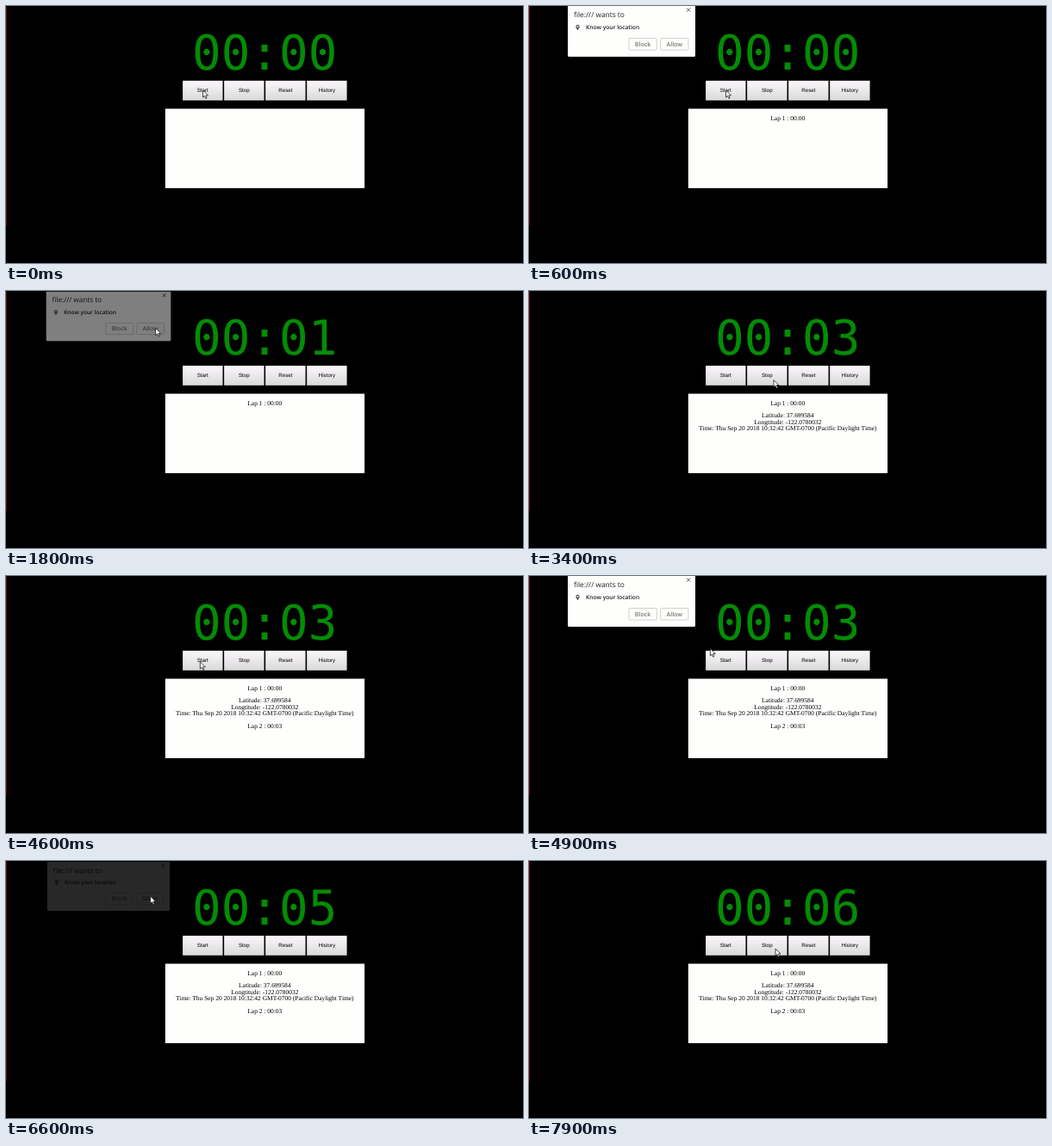
These frames come from a looping animation (600x299 px, 8000 ms). An HTML page:

```html
<!DOCTYPE html>
<html lang="en">
<head>
<meta charset="utf-8">
<title>Stopwatch</title>
<style>
  html, body { margin: 0; width: 100%; height: 100%; overflow: hidden; background: #000; }
  svg { display: block; width: 100%; height: 100%; text-rendering: geometricPrecision; }
  #clock { font: 55.9px "DejaVu Sans Mono", monospace; fill: #048c04; text-anchor: middle; }
  #buttons text { font: 6.21px "Liberation Sans", sans-serif; text-anchor: middle; }
  #laps { font: 7.46px "Liberation Serif", serif; text-anchor: middle; }
  #prompt { font-family: "Open Sans", sans-serif; fill: #222; }
  #prompt .action { font-size: 7.1px; font-weight: 600; fill: #7c7874; text-anchor: middle; }
</style>
</head>
<body>
<svg viewBox="0 0 600 299" xmlns="http://www.w3.org/2000/svg">
  <defs>
    <linearGradient id="face" x1="0" y1="0" x2="0" y2="1">
      <stop offset="0" stop-color="#fbf7fb"/>
      <stop offset="1" stop-color="#dadada"/>
    </linearGradient>
    <linearGradient id="pressed" x1="0" y1="0" x2="0" y2="1">
      <stop offset="0" stop-color="#dcd9dc"/>
      <stop offset="1" stop-color="#f0f0f0"/>
    </linearGradient>
  </defs>
  <rect width="600" height="299"/>
  <rect width="1" height="256" fill="#6a0000"/>
  <text id="clock" x="300.2" y="74.1">00:00</text>
  <g id="buttons"></g>
  <rect x="184.8" y="119.5" width="231.3" height="92.4" fill="#fefefd"/>
  <g id="laps"></g>
  <g id="prompt">
    <path d="M45 0H193V57.5Q193 59 191.5 59H46.5Q45 59 45 57.5Z" fill="#fefefd"/>
    <text x="52" y="12.9" font-size="8.4" font-weight="500">file:/// wants to</text>
    <text x="66" y="27.2" font-size="6.7" font-weight="600">Know your location</text>
    <path d="M56.5 28.2C55.2 26.2 54.3 25 54.3 23.9A2.2 2.2 0 0 1 58.7 23.9C58.7 25 57.8 26.2 56.5 28.2ZM56.5 23A.9 .9 0 1 0 56.51 23Z" fill="#555" fill-rule="evenodd"/>
    <path d="M183 2.4L187.2 6.6M187.2 2.4L183 6.6" stroke="#444" stroke-width=".9"/>
    <g fill="none" stroke="#c8c6c4" stroke-width=".8">
      <rect x="116" y="37.5" width="32.3" height="13.6" rx="1"/>
      <rect x="152.6" y="37.5" width="32.3" height="13.6" rx="1"/>
    </g>
    <text class="action" x="132" y="46.7">Block</text>
    <text class="action" x="168.8" y="46.7">Allow</text>
  </g>
  <path id="cursor" d="M0 0V8.3L1.9 6.5L3.2 9.6L4.6 9L3.3 6H6Z"
        fill="#fff" stroke="#111" stroke-width=".75" stroke-linejoin="round"/>
</svg>
<script>
const LOOP = 8000, STEP = 100;
const $ = id => document.getElementById(id);
const clamp = v => Math.min(1, Math.max(0, v));
const ease = u => u * u * (3 - 2 * u);

// Each run: clock starts, permission is allowed, clock stops.
const runs = [
  { start: 400, allow: 1600, stop: 3500, press: 300 },
  { start: 4600, allow: 6300, stop: LOOP, press: 4500 }
];
const LOCATED = 2100;

const moves = [
  { from: 800, to: 1600, x: 173.6, y: 43.3 },
  { from: 1900, to: 2400, x: 284, y: 103.6 },
  { from: 3800, to: 3900, x: 218.3, y: 95.3 },
  { from: 4200, to: 4400, x: 225.3, y: 99.8 },
  { from: 4700, to: 5300, x: 167.6, y: 41.1 },
  { from: 6600, to: 7300, x: 286, y: 102 }
];

const seconds = t => runs.reduce((sum, { start, stop }) =>
  sum + Math.max(0, Math.floor((Math.min(t, stop) - start) / 1000)), 0);

const promptOpacity = t => Math.max(...runs.map(({ start, allow }) =>
  clamp((t - start) / 200) * (1 - ease(clamp((t - allow) / 400)))));

function pointer(t) {
  let x = 228.5, y = 98;
  for (const m of moves) {
    const u = ease(clamp((t - m.from) / (m.to - m.from)));
    x += (m.x - x) * u;
    y += (m.y - y) * u;
  }
  return [x, y];
}

function add(parent, tag, attrs, text = "") {
  const el = document.createElementNS("http://www.w3.org/2000/svg", tag);
  for (const name in attrs) el.setAttribute(name, attrs[name]);
  el.textContent = text;
  return parent.appendChild(el);
}

const faces = {};
["Start", "Stop", "Reset", "History"].forEach((label, i) => {
  const x = 205.1 + i * 48.03;
  faces[label] = add($("buttons"), "rect", { x, y: 86.9, width: 46.4, height: 22.9 });
  add($("buttons"), "text", { x: x + 23.2, y: 100.1 }, label);
});

const laps = [];
function addLap(from, line, ...texts) {
  texts.forEach((text, i) => {
    const y = 132.6 + (line + i) * 7.42;
    laps.push({ from, el: add($("laps"), "text", { x: 300.3, y }, text) });
  });
}
addLap(runs[0].start, 0, "Lap 1 : 00:00");
addLap(LOCATED, 2, "Latitude: 37.699584", "Longtitude: -122.0780032",
  "Time: Thu Sep 20 2018 10:32:42 GMT-0700 (Pacific Daylight Time)");
addLap(runs[1].start, 6, "Lap 2 : 00:03");

function draw(time) {
  const t = Math.floor(time % LOOP / STEP) * STEP;
  $("clock").textContent = "00:" + String(seconds(t)).padStart(2, "0");
  for (const { el, from } of laps) el.setAttribute("visibility", t >= from ? "visible" : "hidden");

  const down = { Start: runs.some(r => r.press === t), Stop: runs.some(r => r.stop === t) };
  for (const label in faces) {
    faces[label].setAttribute("fill", down[label] ? "url(#pressed)" : "url(#face)");
  }

  const opacity = promptOpacity(t);
  const scale = 1 - .045 * (1 - opacity);
  $("prompt").setAttribute("opacity", opacity);
  $("prompt").setAttribute("transform", `translate(119 29.5) scale(${scale}) translate(-119 -29.5)`);
  $("cursor").setAttribute("transform", `translate(${pointer(t)})`);
}

const begin = performance.now();
function frame() {
  draw(performance.now() - begin);
  requestAnimationFrame(frame);
}
frame();
</script>
</body>
</html>
```
